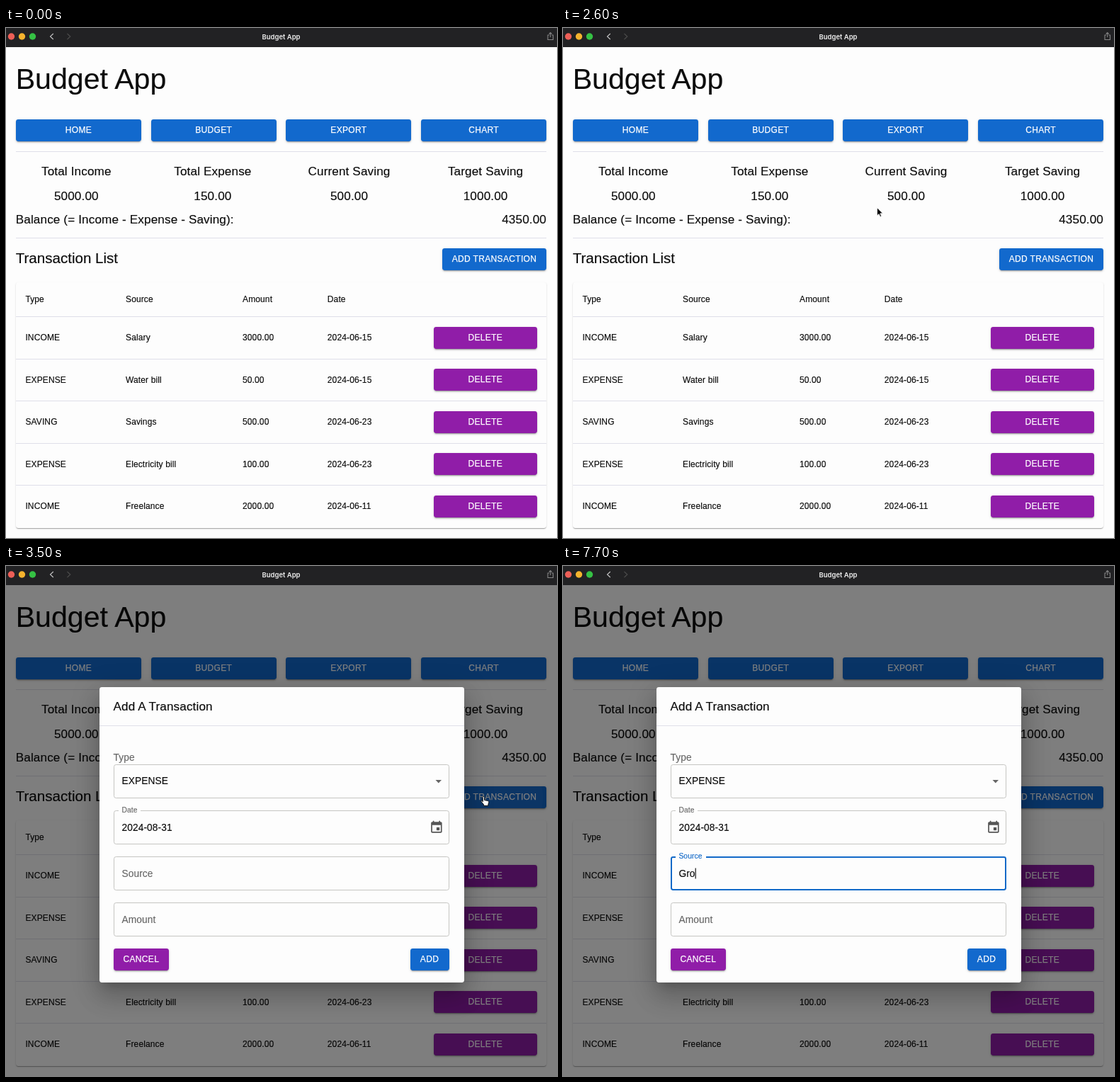
Animation of 778x720 px, one loop 8000 ms. Source, as an HTML page:

```html
<!DOCTYPE html>
<html lang="en">
<head>
<meta charset="utf-8">
<title>Budget App</title>
<style>
html, body { margin: 0; width: 778px; height: 720px; overflow: hidden; background: #fdfdfd; }
#stage { position: relative; width: 778px; height: 720px; overflow: hidden; }
div, svg { position: absolute; box-sizing: border-box; }
svg { left: 0; top: 0; }
.layer { left: 0; top: 0; width: 778px; height: 720px; }
text { font-family: "Liberation Sans", Arial, sans-serif; fill: #0c0c0c; stroke: #0c0c0c; stroke-width: .15px; white-space: pre; }
.h3 { font-size: 41.14px; }
.h5 { font-size: 20.57px; }
.h6 { font-size: 17.14px; letter-spacing: .0075em; }
.body { font-size: 13.71px; letter-spacing: .0094em; }
.cell { font-size: 12px; letter-spacing: .0107em; }
.small { font-size: 10.28px; letter-spacing: .0094em; }
.cap { font-size: 12px; letter-spacing: .0286em; fill: #fff; stroke: #fff; stroke-width: .25px; }
.gray { fill: #666; stroke: #666; }
.win { font: 600 9.5px Inter, sans-serif; fill: #eee; stroke: none; }
.mid { text-anchor: middle; }
.end { text-anchor: end; }
.line { background: #dfdfe9; }
.btn, .hot { border-radius: 3.4px; }
.btn { background: #1269cd; box-shadow: 0 2.6px .9px -1.7px rgba(0,0,0,.2), 0 1.7px 1.7px rgba(0,0,0,.14), 0 .9px 4.3px rgba(0,0,0,.12); }
.purple { background: #901da8; }
.hot { inset: 0; opacity: 0; overflow: hidden; background: #1158b7; }
.hot, .glow { box-shadow: 0 1.7px 3.4px -.9px rgba(0,0,0,.2), 0 3.4px 4.3px rgba(0,0,0,.14), 0 .9px 8.6px rgba(0,0,0,.12); }
.ripple { border-radius: 50%; background: #fff; }
.paper { background: #fdfdfd; border-radius: 3.4px; box-shadow: 0 1.7px .9px -.9px rgba(0,0,0,.2), 0 .9px .9px rgba(0,0,0,.14), 0 .9px 2.6px rgba(0,0,0,.12); }
.modal { background: #fdfdfd; border-radius: 3.4px; box-shadow: 0 9.4px 13px -6px rgba(0,0,0,.2), 0 20.6px 32.6px 2.6px rgba(0,0,0,.14), 0 7.7px 39.4px 6.9px rgba(0,0,0,.12); }
.field { border: 1px solid #c5c5c2; border-radius: 3.4px; }
.notch { background: #fdfdfd; }
.shade { background: rgba(0,0,0,.5); }
.bar { background: #222224; }
</style>
</head>
<body>
<div id="stage"></div>
<script>
const box = (x, y, w, h, cls, inner = '', id = '') =>
  `<div class="${cls}" id="${id}" style="left:${x}px;top:${y}px;width:${w}px;height:${h}px">${inner}</div>`;
const txt = (x, y, s, cls, id = '') => `<text x="${x}" y="${y}" class="${cls}" id="${id}">${s}</text>`;
const svg = body => `<svg width="778" height="720">${body}</svg>`;
const layer = (id, body) => `<div class="layer" id="${id}">${body}</div>`;
const hot = name => `<div class="hot" id="${name}Hot"><div class="ripple" id="${name}Ripple"></div></div>`;

// Main page
function page() {
  let boxes = '', texts = '';
  const button = (x, y, w, label, cls = '', inner = '') => {
    boxes += box(x, y, w, 31, 'btn ' + cls, inner);
    texts += txt(x + w / 2, y + 19, label, 'cap mid');
  };
  texts += txt(13.7, 86, 'Budget App', 'h3');
  ['HOME', 'BUDGET', 'EXPORT', 'CHART'].forEach((s, i) =>
    button(14 + i * 190.7, 129, 177, s, '', i ? '' : hot('home')));
  boxes += box(14, 174, 749, 1, 'line') + box(14, 296, 749, 1, 'line');
  [['Total Income', '5000.00'], ['Total Expense', '150.00'],
   ['Current Saving', '500.00'], ['Target Saving', '1000.00']].forEach(([name, sum], i) => {
    const x = 99.3 + i * 192.6;
    texts += txt(x, 208, name, 'h6 mid') + txt(x, 242.5, sum, 'h6 mid');
  });
  texts += txt(13.7, 276, 'Balance (= Income - Expense - Saving):', 'h6') + txt(763, 276, '4350.00', 'h6 end');
  texts += txt(13.7, 332, 'Transaction List', 'h5');
  button(616, 311.4, 147, 'ADD TRANSACTION', '', hot('add'));

  boxes += box(14, 359, 749, 347, 'paper');
  const cols = [27.4, 169, 334, 453.8];
  const row = (cells, y) => cells.forEach((s, i) => { texts += txt(cols[i], y, s, 'cell'); });
  row(['Type', 'Source', 'Amount', 'Date'], 387);
  [['INCOME', 'Salary', '3000.00', '2024-06-15'],
   ['EXPENSE', 'Water bill', '50.00', '2024-06-15'],
   ['SAVING', 'Savings', '500.00', '2024-06-23'],
   ['EXPENSE', 'Electricity bill', '100.00', '2024-06-23'],
   ['INCOME', 'Freelance', '2000.00', '2024-06-11']].forEach((cells, i) => {
    const dy = i * 59.6;
    boxes += box(14, Math.round(407 + dy), 749, 1, 'line');
    row(cells, 441 + dy);
    button(604, 421.6 + dy, 145.5, 'DELETE', 'purple');
  });
  return layer('page', boxes + svg(texts));
}

// Form dialog with its backdrop
function dialog() {
  const field = (y, id) => box(151.5, y, 474, 48, 'field', '', id);
  const boxes = box(0, 27, 778, 693, 'shade') + box(131.5, 171, 515, 416.5, 'modal') +
    box(131.5, 225, 515, 1, 'line') +
    field(280) + field(345) + field(410, 'source') + field(475) +
    box(159, 344, 31, 3, 'notch') + box(159, 409, 0, 3, 'notch', '', 'notch') +
    box(151.5, 540, 78.5, 31, 'btn purple') + box(570.5, 540, 55, 31, 'btn');
  const texts = txt(151.5, 204, 'Add A Transaction', 'h6') +
    txt(151.5, 275, 'Type', 'body gray') +
    txt(163.4, 308, 'EXPENSE', 'body') +
    txt(163.4, 348, 'Date', 'small gray') +
    txt(163.4, 374, '2024-08-31', 'body') +
    txt(163.4, 439, 'Source', 'body gray', 'label') +
    txt(163.4, 439, '', 'body', 'typed') +
    txt(163.4, 504, 'Amount', 'body gray') +
    txt(190.8, 559, 'CANCEL', 'cap mid') + txt(598, 559, 'ADD', 'cap mid') +
    '<path d="M606.5 302h8.5l-4.25 4.4z" fill="#666"/>' +
    '<path transform="translate(597.6 358.8) scale(.857)" fill="#555" d="M17 12h-5v5h5v-5zM16 1v2H8V1H6v2H5c-1.1 0-2 .9-2 2v14c0 1.1.9 2 2 2h14c1.1 0 2-.9 2-2V5c0-1.1-.9-2-2-2h-1V1h-2zm3 18H5V8h14v11z"/>' +
    '<rect id="caret" y="426.5" width="1.1" height="15" fill="#000"/>';
  return layer('dialog', boxes + svg(texts));
}

function titleBar() {
  const dots = ['#ed5f57', '#f5b32e', '#35c144'].map((c, i) =>
    `<circle cx="${7.5 + i * 15}" cy="12" r="4.7" fill="${c}"/>`).join('');
  const icon = (d, c) => `<path d="${d}" fill="none" stroke="${c}" stroke-width="1.1"/>`;
  return box(0, 0, 778, 27, 'bar') + svg(dots +
    icon('M66.8 8l-4.3 4 4.3 4', '#c4c4c4') + icon('M86.5 8l4.3 4-4.3 4', '#4c4c4c') +
    icon('M767 10h-2v6.5h7.5V10h-2M768.7 13V6.5M766.7 8.5l2-2 2 2', '#858585') +
    txt(388.5, 15.6, 'Budget App', 'win mid'));
}

const cursors = svg(`<g id="cursor">
  <path id="arrow" d="M0 0V11.2l2.6-2.4 1.7 3.9 1.8-.8-1.7-3.8H8z" fill="#000" stroke="#fff" stroke-width=".8"/>
  <path id="hand" d="M-1.2 7V.8a1.1 1.1 0 0 1 2.2 0V4.8l1.9.3 1.8.4 1.6.5c.9.3 1 .9.9 1.8l-.9 3.2v1.6H.1v-1.4C-1 9.6-2.5 8-3.4 6.8c-.6-1 .5-1.8 1.4-1z" fill="#fff" stroke="#111" stroke-width="1"/>
  <g id="beam" fill="none" stroke="#111">
    <circle r="11.3" fill="#fdfdfd" stroke-width="2.2"/>
    <path d="M-2.5-5.5Q0-5.5 0-3.8V3.8Q0 5.5-2.5 5.5M2.5-5.5Q0-5.5 0-3.8M0 3.8Q0 5.5 2.5 5.5M-1.5 1.5h3"/>
  </g></g>`);

document.getElementById('stage').innerHTML = page() + dialog() + titleBar() + cursors;
const $ = id => document.getElementById(id);

const clamp = p => Math.min(1, Math.max(0, p));
const ramp = (t, start, len) => clamp((t - start) / len);
const smooth = p => p * p * (3 - 2 * p);
const easeOut = p => 1 - (1 - p) ** 3;

// cubic-bezier(.4, 0, .2, 1)
function standard(p) {
  let lo = 0, hi = 1, s;
  for (let i = 0; i < 20; i++) {
    s = (lo + hi) / 2;
    const x = 1.2 * (1 - s) ** 2 * s + .6 * (1 - s) * s * s + s ** 3;
    if (x < p) lo = s; else hi = s;
  }
  return 3 * (1 - s) * s * s + s ** 3;
}

const path = [[100, 8, 230], [500, 78, 152], [700, 79.5, 149.6], [1500, 87.6, 142.8],
  [2200, 87.6, 142.8], [2900, 674.5, 325.8], [3600, 674.5, 325.8], [4700, 248.5, 440.5]];
const kinds = [[100, 'arrow'], [400, 'hand'], [2300, 'arrow'], [2800, 'hand'],
  [3600, 'arrow'], [4400, 'beam'], [7500, '']];

function moveCursor(t) {
  const i = path.findIndex(k => k[0] > t);
  let [, x, y] = path[i < 0 ? path.length - 1 : Math.max(0, i - 1)];
  if (i > 0) {
    const [t0] = path[i - 1], [t1, x1, y1] = path[i];
    const p = smooth((t - t0) / (t1 - t0));
    x += (x1 - x) * p;
    y += (y1 - y) * p;
  }
  $('cursor').setAttribute('transform', `translate(${x} ${y})`);
  const now = kinds.filter(k => k[0] <= t).pop();
  for (const id of ['arrow', 'hand', 'beam'])
    $(id).style.display = now && now[1] === id ? '' : 'none';
}

function press(name, t, { enter, leave, down, up, x, y, r }) {
  $(name + 'Hot').style.opacity = standard(ramp(t, enter, 250)) * (1 - standard(ramp(t, leave, 250)));
  const grow = standard(ramp(t, down, 550)), rad = r * grow;
  Object.assign($(name + 'Ripple').style, {
    left: x - rad + 'px', top: y - rad + 'px', width: 2 * rad + 'px', height: 2 * rad + 'px',
    opacity: (.1 + .2 * grow) * (1 - standard(ramp(t, up, 550)))
  });
}

function form(t) {
  const show = standard(ramp(t, 3300, 190));
  $('dialog').style.opacity = show;
  $('dialog').style.visibility = show > 0 ? 'visible' : 'hidden';

  const focus = t >= 6400, p = easeOut(ramp(t, 6350, 200));
  $('source').style.border = focus ? '2px solid #1269c8' : `1px solid ${t >= 4400 ? '#222' : '#c5c5c2'}`;
  $('notch').style.width = 43 * p + 'px';
  const label = $('label');
  label.setAttribute('y', 439 - 26 * p);
  label.style.fontSize = 13.71 * (1 - .25 * p) + 'px';
  label.style.fill = label.style.stroke = focus ? '#1269c8' : '';

  const typed = $('typed');
  typed.textContent = 'Gro'.slice(0, t < 7500 ? 0 : Math.floor((t - 7500) / 100) + 1);
  const width = typed.textContent ? typed.getComputedTextLength() : 0;
  $('caret').setAttribute('x', 163.4 + width);
  $('caret').style.display = focus && (t < 7000 || t >= 7500) ? '' : 'none';
}

function draw(t) {
  moveCursor(t);
  press('home', t, { enter: 400, leave: 2300, down: 1675, up: 1900, x: 73.5, y: 15, r: 106 });
  press('add', t, { enter: 2800, leave: 3350, down: 3134, up: 3350, x: 60, y: 15, r: 89 });
  form(t);
}

const start = performance.now();
(function tick() {
  const t = Math.max(0, performance.now() - start) % 8000;
  draw(Math.floor(t / 100) * 100);
  requestAnimationFrame(tick);
})();
</script>
</body>
</html>
```
